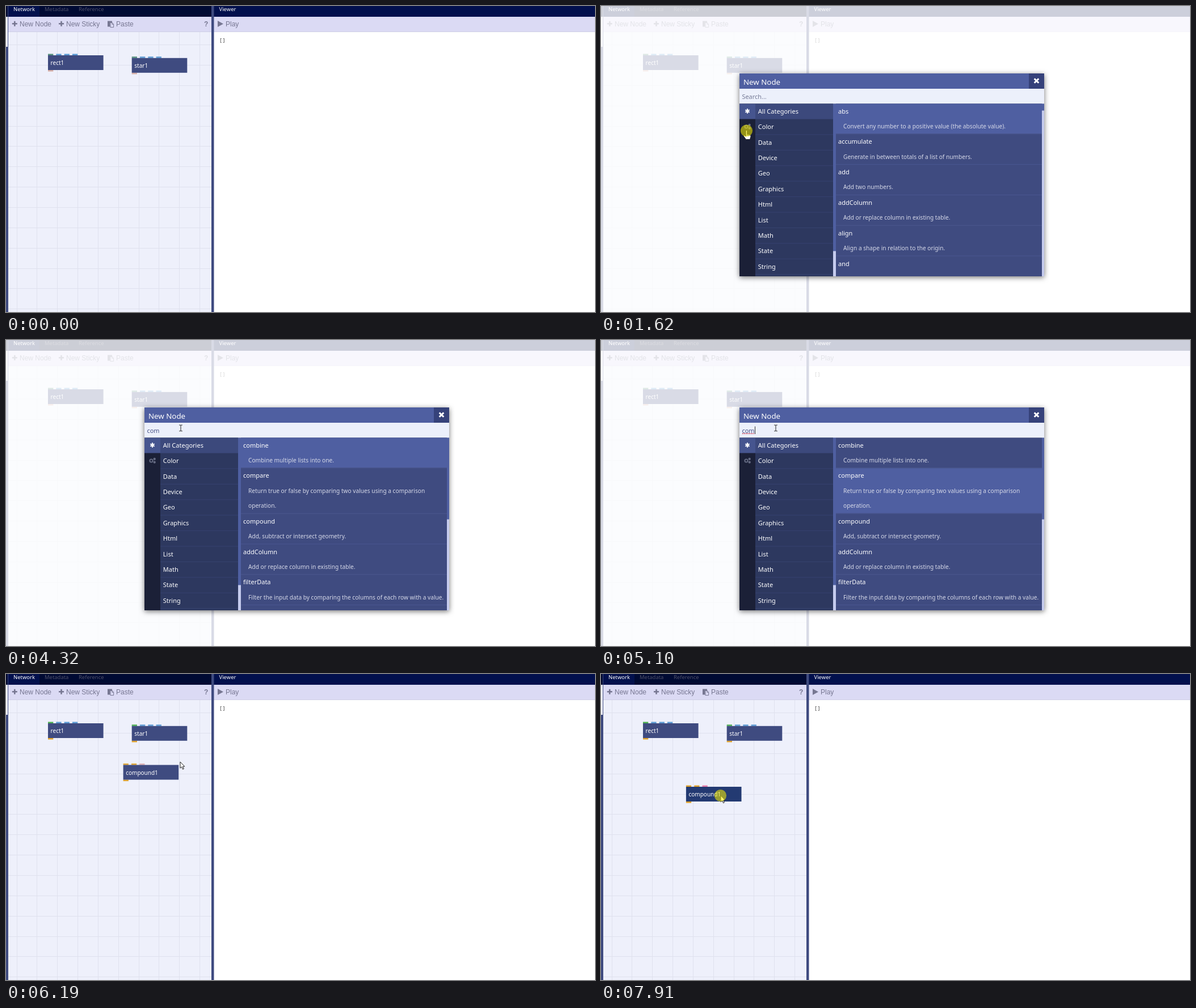
Recreate the animation shown at these times as an HTML page. Size 1038 px wide and 540 px high, loop 7.99 s.

```html
<!DOCTYPE html>
<html lang="en">
<head>
<meta charset="utf-8">
<title>New Node</title>
<style>
  html, body { margin: 0; width: 100%; height: 100%; overflow: hidden; background: #fff; }
  svg { display: block; width: 1038px; height: 540px; }
  text { font-family: "Noto Sans", "Open Sans", sans-serif; white-space: pre; }
  .tab { font-size: 9.45px; font-weight: 500; fill: #fff; }
  .tab.off { fill: #4d5069; }
  .tool { font: 12px "Liberation Sans", Arial, sans-serif; fill: #777792; }
  .node { font-size: 10px; font-weight: 500; fill: #fff; }
  .menu { font-size: 11.1px; fill: #555; }
  .title { font-size: 13.3px; font-weight: 500; fill: #fff; }
  .search { font-size: 10.9px; fill: #4a5488; }
  .hint { fill: #757a96; }
  .name { font-size: 11px; font-weight: 500; fill: #fff; }
  .desc { font-size: 10.16px; fill: #d6d9e8; }
  .code { font: 9.5px "Noto Sans Mono", monospace; fill: #444; }
  #menu { filter: drop-shadow(0 1px 2px rgba(0, 0, 0, .4)); }
  #dialog { filter: drop-shadow(0 2px 5px rgba(0, 0, 0, .55)); }
  .cursor { fill: #fff; stroke: #222; stroke-width: 1; stroke-linejoin: round; }
</style>
</head>
<body>
<svg viewBox="0 0 1038 540">
  <defs>
    <clipPath id="canvasClip"><rect x="4" y="46" width="358" height="494"/></clipPath>
    <clipPath id="dialogClip"><rect x="244" y="119" width="537" height="358"/></clipPath>
  </defs>

  <rect width="1038" height="540" fill="#fff"/>
  <rect x="4" y="45" width="358" height="495" fill="#eef0fb"/>
  <path id="grid" clip-path="url(#canvasClip)" stroke="#dfe1ee" fill="none"/>
  <rect width="362" height="19" fill="#000a33"/>
  <rect x="4" width="55" height="19" fill="#02104d"/>
  <rect x="366" width="672" height="19" fill="#02104d"/>
  <path d="M4 19H362V45.5H4zM366 19H1038V45.5H366z" fill="#dbdaf4"/>
  <path d="M4 45.5H362M366 45.5H1038" stroke="#cfcfe6"/>
  <rect y="19" width="3" height="53" fill="#f4f5fc"/>
  <path d="M3 0H4V72H3zM0 72H4V540H0zM362 0H366.5V540H362z" fill="#3f4b80"/>
  <text class="tab" x="13" y="9">Network</text>
  <text class="tab off" x="68" y="9">Metadata</text>
  <text class="tab off" x="128" y="9">Reference</text>
  <text class="tab" x="375.5" y="9">Viewer</text>

  <path d="M10.8 31.3h9M15.3 26.8v9M93 31.3h9M97.5 26.8v9" stroke="#777792" stroke-width="2.6"/>
  <path d="M179 26.5h8v3h-3.5v7H179z" fill="#777792"/>
  <path d="M183.9 29.5h3.3l2.4 2.4v5.7h-5.7zM187 29.8v2.5h2.5" fill="#dbdaf4" stroke="#777792"/>
  <path d="M373 26l10 5.5-10 5.5z" fill="#777792"/>
  <text class="tool" x="24" y="36">New Node</text>
  <text class="tool" x="106" y="36">New Sticky</text>
  <text class="tool" x="194" y="36">Paste</text>
  <text class="tool" x="349" y="36" style="font-weight:bold">?</text>
  <text class="tool" x="387" y="36">Play</text>
  <text class="code" x="375.5" y="64">[]</text>
  <g id="nodes"></g>

  <g id="menu">
    <rect x="226.5" y="208.5" width="134" height="47.5" fill="#fff" stroke="#bbb" stroke-width=".6"/>
    <rect id="menuHover" x="227" y="209" width="133" height="24" fill="#ebebeb"/>
    <text class="menu" x="236" y="225">New Node</text>
    <text class="menu" x="236" y="248">Reset View</text>
  </g>

  <rect id="veil" width="1038" height="540" fill="#fff" fill-opacity=".8"/>
  <g id="dialog"><g id="panel" clip-path="url(#dialogClip)">
    <rect x="244" y="119" width="537" height="27" fill="#4f5fa1"/>
    <rect x="754" y="119" width="27" height="27" fill="#36427a"/>
    <path d="M763.7 128.2l7.6 7.6M771.3 128.2l-7.6 7.6" stroke="#fff" stroke-width="3"/>
    <text class="title" x="251" y="139.3">New Node</text>
    <rect x="244" y="146" width="537" height="26.5" fill="#ecf0fb"/>
    <text class="search hint" id="hint" x="248.5" y="163.5">Search...</text>
    <text class="search" id="query" x="248.5" y="163.5"></text>
    <path id="squiggle" d="M249 165.3H270.5" stroke="#d04a5c" stroke-width="1.4" stroke-dasharray="2 1"/>
    <rect id="caret" y="152.5" width="1" height="13.5" fill="#333"/>
    <rect x="244" y="172.5" width="28" height="305" fill="#1b2037"/>
    <rect x="244" y="172.5" width="28" height="27" fill="#46558f"/>
    <rect x="272" y="172.5" width="137" height="305" fill="#2d385f"/>
    <rect x="272" y="172.5" width="137" height="27" fill="#3c497c"/>
    <path d="M258 181.3v8.4M254.4 183.4l7.2 4.2M254.4 187.6l7.2-4.2" stroke="#fff" stroke-width="2"/>
    <g fill="none" stroke="#666c84" stroke-width="1.9">
      <circle cx="256" cy="213" r="2.6"/><circle cx="261.7" cy="210" r="1.2"/><circle cx="261.7" cy="215.7" r="1.2"/>
    </g>
    <rect x="409" y="172.5" width="5" height="305" fill="#4f5fa1"/>
    <rect x="409" y="432.5" width="5" height="45" fill="#c5cbee"/>
    <rect x="414" y="172.5" width="363" height="305" fill="#3f4b80"/>
    <rect x="777" y="172.5" width="4" height="305" fill="#c5cbee"/>
    <rect id="thumb" x="777" y="172.5" width="4" fill="#4f5fa1"/>
    <rect id="highlight" x="414" width="363" fill="#4f5fa1"/>
  </g></g>

  <g id="pointer">
    <path id="arrow" class="cursor" d="M0 0V11.2L2.6 8.8L4.5 13.2L6.4 12.3L4.5 8.2H7.8z"/>
    <path id="hand" class="cursor" d="M-1.8 .2Q-.6-1.4.6 .2V6L5 7Q7.3 7.8 7 10.5L5.5 15.5H-1.5L-5.6 9.8Q-6 7.6-4 8L-1.8 10zM2.6 6.6V9.2M4.7 7V9.2M.6 6V9"/>
    <path id="ibeam" fill="none" stroke="#222" d="M-2.8-5.2H-.8L0-4.6L.8-5.2H2.8M0-4.6V4.8M-2.8 5.4H-.8L0 4.8L.8 5.4H2.8"/>
    <circle id="click" cx="-.5" r="10.6" fill="#f6ee00" fill-opacity=".56"/>
  </g>
</svg>

<script>
const LOOP = 7990, OPEN = 1620, CLOSE = 6190, DRAG = 7530;
const ROW = 53.8, LINE = 26.6, LIST_TOP = 172.4;
const $ = id => document.getElementById(id);

function add(parent, tag, attrs, content = '') {
  const node = document.createElementNS('http://www.w3.org/2000/svg', tag);
  for (const key in attrs) node.setAttribute(key, attrs[key]);
  node.textContent = content;
  return parent.appendChild(node);
}
const addRect = (parent, x, y, width, height, fill) => add(parent, 'rect', { x, y, width, height, fill });
const addText = (parent, x, y, cls, content) => add(parent, 'text', { x, y, class: cls }, content);
const show = (id, on) => $(id).setAttribute('visibility', on ? 'inherit' : 'hidden');
const move = (node, x, y) => node.setAttribute('transform', `translate(${x} ${y})`);
const within = (t, spans) => spans.some(([from, to]) => t >= from && t < to);
const latest = (t, steps) => steps.filter(step => step[0] <= t).pop();

let grid = '';
for (let i = 0; i < 14; i++) {
  const step = i * 35.85;
  if (i < 10) grid += `M${Math.floor(20 + step) - .5} 46V540`;
  grid += `M4 ${Math.floor(68.7 + step) + .5}H362`;
}
$('grid').setAttribute('d', grid);

function addNode(name, x, y, ports) {
  const group = add($('nodes'), 'g', {});
  move(group, x, y);
  const inputs = ports.map((color, i) => addRect(group, i * 14.3, -2.5, 9.3, 2.5, color));
  const output = addRect(group, 0, 26, 9.3, 2.6, '#e0a32e');
  const body = addRect(group, 0, 0, 97.6, 26, '#3f4b80');
  addText(group, 4.6, 17, 'node', name);
  return { group, inputs, output, body };
}
const shapePorts = ['#4caf50', '#5c9bd4', '#5c9bd4', '#5c9bd4'];
const shapes = [addNode('rect1', 74, 87, shapePorts), addNode('star1', 221.7, 91.8, shapePorts)];
const compound = addNode('compound1', 206.6, 160.5, ['#e0a32e', '#e0a32e', '#dfb0b2']);

const panel = $('panel');
['All Categories', 'Color', 'Data', 'Device', 'Geo', 'Graphics', 'Html', 'List', 'Math', 'State', 'String']
  .forEach((name, i) => {
    addText(panel, 276.8, 189.7 + i * 27.42, 'name', name);
    addRect(panel, 272, 199 + i * 27.42, 137, 1, '#364270');
  });

const combine = ['combine', 'Combine multiple lists into one.'];
const compare = ['compare', 'Return true or false by comparing two values using a comparison', 'operation.'];
const compoundItem = ['compound', 'Add, subtract or intersect geometry.'];
const addColumn = ['addColumn', 'Add or replace column in existing table.'];
const lists = {
  '': { thumb: 12, items: [
    ['abs', 'Convert any number to a positive value (the absolute value).'],
    ['accumulate', 'Generate in between totals of a list of numbers.'],
    ['add', 'Add two numbers.'], addColumn,
    ['align', 'Align a shape in relation to the origin.'],
    ['and', 'Return true if both of the inputs are true.']] },
  c: { thumb: 26, items: [
    ['ceil', 'Round a number up to the nearest integer.'],
    ['centroid', 'Calculate the center point of a shape.'],
    ['color', 'Create a color.'],
    ['colorize', 'Change the color of a shape.'], combine, compare] },
  co: { thumb: 66, items: [
    ['color', 'Create a color.'],
    ['colorize', 'Change the color of a shape.'], combine, compare, compoundItem] },
  com: { thumb: 144, items: [combine, compare, compoundItem, addColumn,
    ['filterData', 'Filter the input data by comparing the columns of each row with a value.'],
    ['completed', '']] }
};
for (const list of Object.values(lists)) {
  list.group = add(panel, 'g', {});
  let y = LIST_TOP;
  list.rows = list.items.map(([name, ...lines]) => {
    const row = { y, height: ROW + (lines.length - 1) * LINE };
    addText(list.group, 418, y + 17.2, 'name', name);
    lines.forEach((line, i) => addText(list.group, 427, y + 43.4 + i * LINE, 'desc', line));
    y += row.height;
    addRect(list.group, 414, y - .9, 363, 1, '#4a578f');
    return row;
  });
}

const typing = [[0, ''], [3160, 'c'], [3630, 'co'], [3780, 'com']];
const selection = [[0, 0], [5100, 1], [5260, 2]];
const caretOn = [[1700, 2080], [2380, 2930], [3160, 4320], [4790, 5340], [5890, CLOSE]];
const squiggleOn = [[4870, 5340], [5890, CLOSE]];
const clicks = [[780, 920], [1550, 1700], [2380, 2620], [7370, LOOP]];
const pointerPath = [
  [170, 573, 429, 'arrow'], [240, 527, 388, 'arrow'],
  [390, 440, 334, 'arrow'], [470, 312, 252, 'arrow'], [550, 222, 212, 'arrow'], [630, 226, 209, 'arrow'],
  [1150, 236, 213, 'hand'], [1230, 251, 219, 'hand'], [1310, 257, 220, 'hand'],
  [2010, 285, 183, 'hand'], [2080, 308, 155.3, 'ibeam'],
  [6120, 307, 155, 'arrow'],
  [6900, 303, 162, 'arrow'], [6980, 288, 175, 'arrow'], [7060, 275, 182, 'arrow'],
  [7130, 270, 180, 'arrow'], [7210, 271, 176, 'arrow'],
  [DRAG, 266, 179, 'arrow'], [7600, 254, 187, 'arrow'], [7680, 238, 198, 'arrow'],
  [7760, 223, 207, 'arrow'], [7830, 214, 212.5, 'arrow'], [7910, 211, 214.5, 'arrow']
];

function drawDialog(t) {
  const query = latest(t, typing)[1];
  const list = lists[query];
  for (const other of Object.values(lists)) other.group.style.display = other === list ? '' : 'none';
  $('query').textContent = query;
  show('hint', !query);
  $('thumb').setAttribute('height', list.thumb);
  const row = list.rows[latest(t, selection)[1]];
  $('highlight').setAttribute('y', row.y);
  $('highlight').setAttribute('height', row.height - .9);
  const width = query ? $('query').getComputedTextLength() : 0;
  $('caret').setAttribute('x', Math.round(248.6 + width));
  show('caret', within(t, caretOn));
  show('squiggle', within(t, squiggleOn));
}

function drawNodes(t, x, y) {
  const vivid = t >= CLOSE, hovered = t >= 7060;
  for (const { inputs, output } of shapes) {
    inputs[0].setAttribute('fill', vivid ? '#4caf50' : '#548f7c');
    output.setAttribute('fill', vivid ? '#e0a32e' : '#d8b0a8');
  }
  compound.group.style.display = vivid ? '' : 'none';
  compound.body.setAttribute('fill', hovered ? '#233a72' : '#3f4b80');
  compound.inputs[2].setAttribute('fill', hovered ? '#e680ac' : '#dfb0b2');
  const dragged = t >= DRAG;
  move(compound.group, 206.6 + (dragged ? (x - 271) * .945 : 0), 160.5 + (dragged ? y - 176 : 0));
}

function draw(t) {
  const [, x, y, shape] = latest(t, pointerPath) || [0, 0, 0, ''];
  const open = t >= OPEN && t < CLOSE;
  show('pointer', shape);
  move($('pointer'), x, y);
  for (const id of ['arrow', 'hand', 'ibeam']) show(id, id === shape);
  show('click', within(t, clicks));
  $('menu').style.display = t >= 850 && t < OPEN ? '' : 'none';
  show('menuHover', t >= 1150);
  $('veil').style.display = $('dialog').style.display = open ? '' : 'none';
  if (open) drawDialog(t);
  drawNodes(t, x, y);
}

const start = performance.now();
(function tick() {
  draw((performance.now() - start) % LOOP);
  requestAnimationFrame(tick);
})();
</script>
</body>
</html>
```
